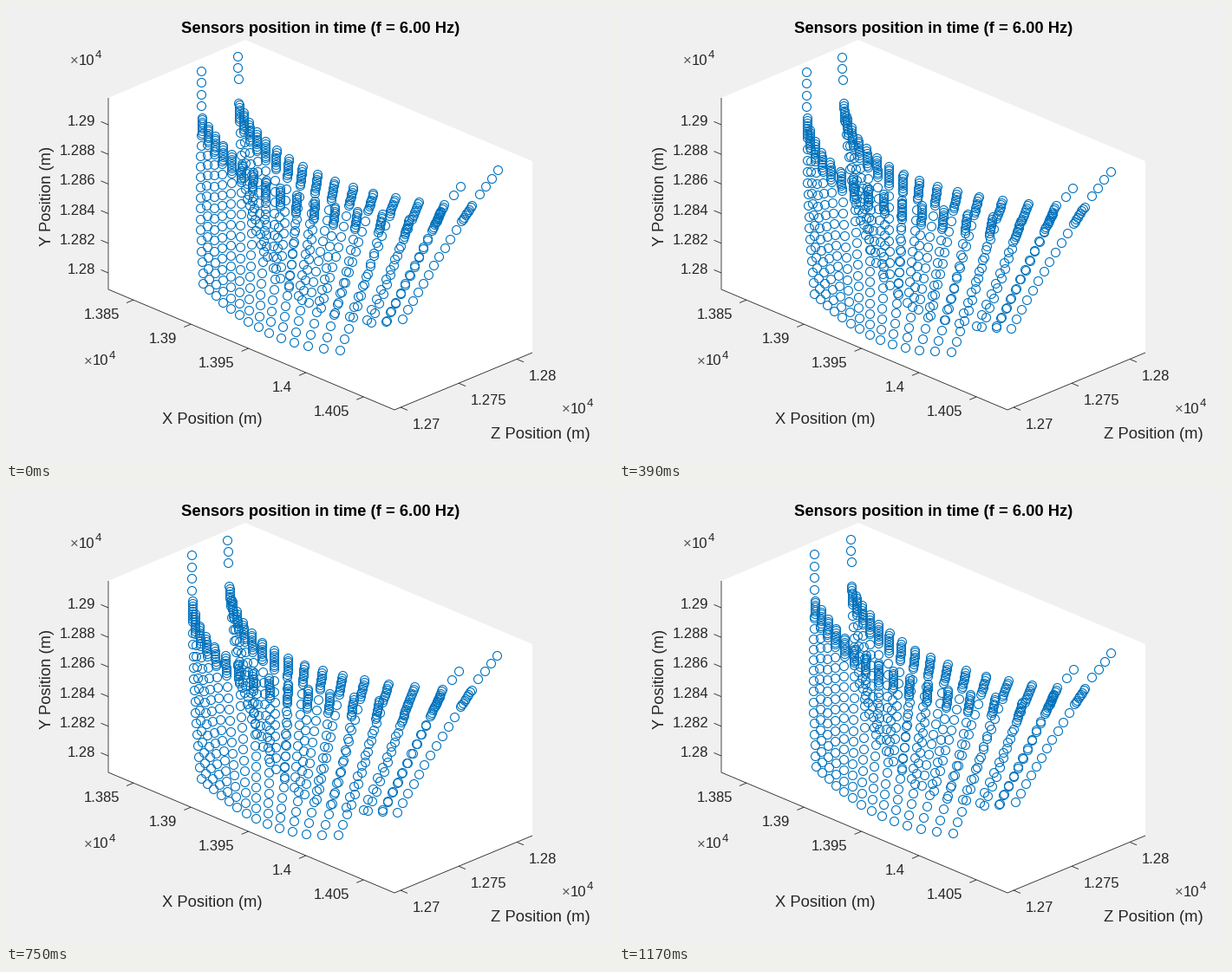
A matplotlib script that plays this animation: 700 px wide and 525 px high, repeating every 1200 ms.

```python
import numpy as np
import matplotlib.pyplot as plt
from matplotlib.animation import FuncAnimation

W, H = 700, 525
FRAMES, INTERVAL = 40, 30
PX = 0.72  # points per pixel at 100 dpi
BLUE, INK = "#0072BD", "#262626"
CREST, GAP = 22, 12.4  # height of the dense crest, spacing below it
POSE = np.cos(2 * np.pi * 9 / FRAMES)  # wave value at which the walls are laid out

plt.rcParams["font.family"] = "Liberation Sans"
fig = plt.figure(figsize=(W / 100, H / 100), dpi=100, facecolor="#f0f0f0")
ax = fig.add_axes([0, 0, 1, 1])
ax.set_xlim(0, W)
ax.set_ylim(H, 0)
ax.axis("off")


def label(x, y, text, size=16.67, ha="center", **kw):
    kw.setdefault("color", INK)
    ax.text(x, y, text, fontsize=size * PX, ha=ha, va="center_baseline", **kw)


def line(xs, ys):
    ax.plot(xs, ys, color=INK, lw=0.6, solid_capstyle="butt")


def exponent(x, y):
    label(x, y, "×", ha="left", color="#555555")
    label(x + 10, y, "10", ha="left")
    label(x + 29, y - 6, "4", 13.3, ha="left")


def ticks(texts, start, step, mark, offset, ha):
    """Tick marks along one axis, each with its label beside it."""
    for i, text in enumerate(texts):
        x, y = np.add(start, np.multiply(step, i))
        line([x, x + mark[0]], [y, y + mark[1]])
        label(x + offset[0], y + offset[1], text, ha=ha)


def draw_axes():
    ax.fill([118, 276, 607, 607, 448, 118], [106, 39, 179, 400, 466, 327],
            color="white", lw=0)
    line([118, 118, 448, 607], [106, 327, 466, 400])
    ticks([f"{1.29 - 0.002 * i:.4g}" for i in range(6)],
          (118, 137), (0, 34.2), (-8.5, -3.6), (-14.5, -5), "right")
    ticks([f"{1.385 + 0.005 * i:.4g}" for i in range(5)],
          (147, 339.2), (66.3, 27.95), (-8, 3.3), (-16, 16), "right")
    ticks([f"{1.27 + 0.005 * i:.4g}" for i in range(3)],
          (455, 463), (67, -27.8), (8, 3.4), (14, 18.5), "left")
    for x, y in [(74, 61.5), (90, 408.5), (641, 463.5)]:
        exponent(x, y)
    label(362.5, 24.5, "Sensors position in time (f = 6.00 Hz)", 18.33,
          weight="bold", color="black")
    label(238, 475, "X Position (m)", 18.33)
    label(616, 492.5, "Z Position (m)", 18.33)
    ax.text(48, 219, "Y Position (m)", fontsize=18.33 * PX, color=INK,
            rotation=90, ha="center", va="center")


def edge(keys, count):
    """Smooth curve through evenly spaced keys of (x, y, swing x, swing y)."""
    keys = np.array(keys, float)
    t = np.linspace(0, 1, len(keys))
    u = np.linspace(0, 1, count)
    return np.transpose([np.polyval(np.polyfit(t, k, len(t) - 1), u) for k in keys.T])


def column(top, foot, bow, lift):
    """A dense crest, then even steps down to the foundation."""
    length = np.hypot(*(foot - top)[:2])
    steps = round((length - CREST) / GAP)
    depth = np.r_[np.linspace(0, CREST, 9),
                  np.linspace(CREST, length, steps + 1)[1:]]
    s = depth[:, None] / length
    return top + (foot - top) * s + 4 * s * (1 - s) * [bow, 0, 0, lift]


def wall(count, crest, foundation, bows, lift=0):
    return [column(top, foot, bow, lift) for top, foot, bow in
            zip(edge(crest, count), edge(foundation, count), np.linspace(*bows, count))]


def mast(start, step, count, swing):
    """A loose row of sensors rising above the crest."""
    return [np.r_[np.add(start, np.multiply(step, k)), swing] for k in range(count)]


front = wall(
    14,
    [(221, 129, 6.5, -0.5), (254, 180, 11.5, -6), (323, 219, 6.7, -4), (432, 242, 2, -2)],
    [(226, 327, 1.5, -8), (261, 357, 1.5, -6.5), (311, 385, 1.3, -5), (384, 398, 1, -1)],
    (-3, 5), lift=-2)
back = wall(
    15,
    [(263, 112, 6.5, -0.5), (299, 168, 10, -6), (379, 208, 8, -4), (504, 230, 0.8, -0.8)],
    [(275, 226, 3, -3), (303, 302, 3, -5), (351, 349, 3, -6), (436, 367, 2, -4)],
    (-2, 2))
bank = wall(
    3,
    [(464, 247, 1.5, -1.5), (537, 231, 0.5, -1)],
    [(419, 368, 2, -4), (454, 367, 3.7, -7.5)],
    (2, -2))
masts = [
    mast((219.8, 116), (0, -13.5), 4, (6.5, -0.6)),
    mast((262, 84.5), (-0.4, -13.1), 3, (6.8, -0.6)),
    mast((545, 218), (7.3, -9.2), 4, (0.6, -1.3)),
    mast((515, 219), (8, -10), 2, (0.7, -1.2)),
]
sensors = np.vstack(front + back + bank + masts)
points, swing = sensors[:, :2], sensors[:, 2:]

draw_axes()
dots, = ax.plot([], [], "o", ms=10 * PX, mfc="none", mec=BLUE, mew=0.8)


def update(frame):
    wave = np.cos(2 * np.pi * frame / FRAMES) - POSE
    dots.set_data(*(points + swing * wave).T)
    return dots,


anim = FuncAnimation(fig, update, frames=FRAMES, interval=INTERVAL,
                     repeat=True, repeat_delay=0, blit=False)
plt.show()
```
